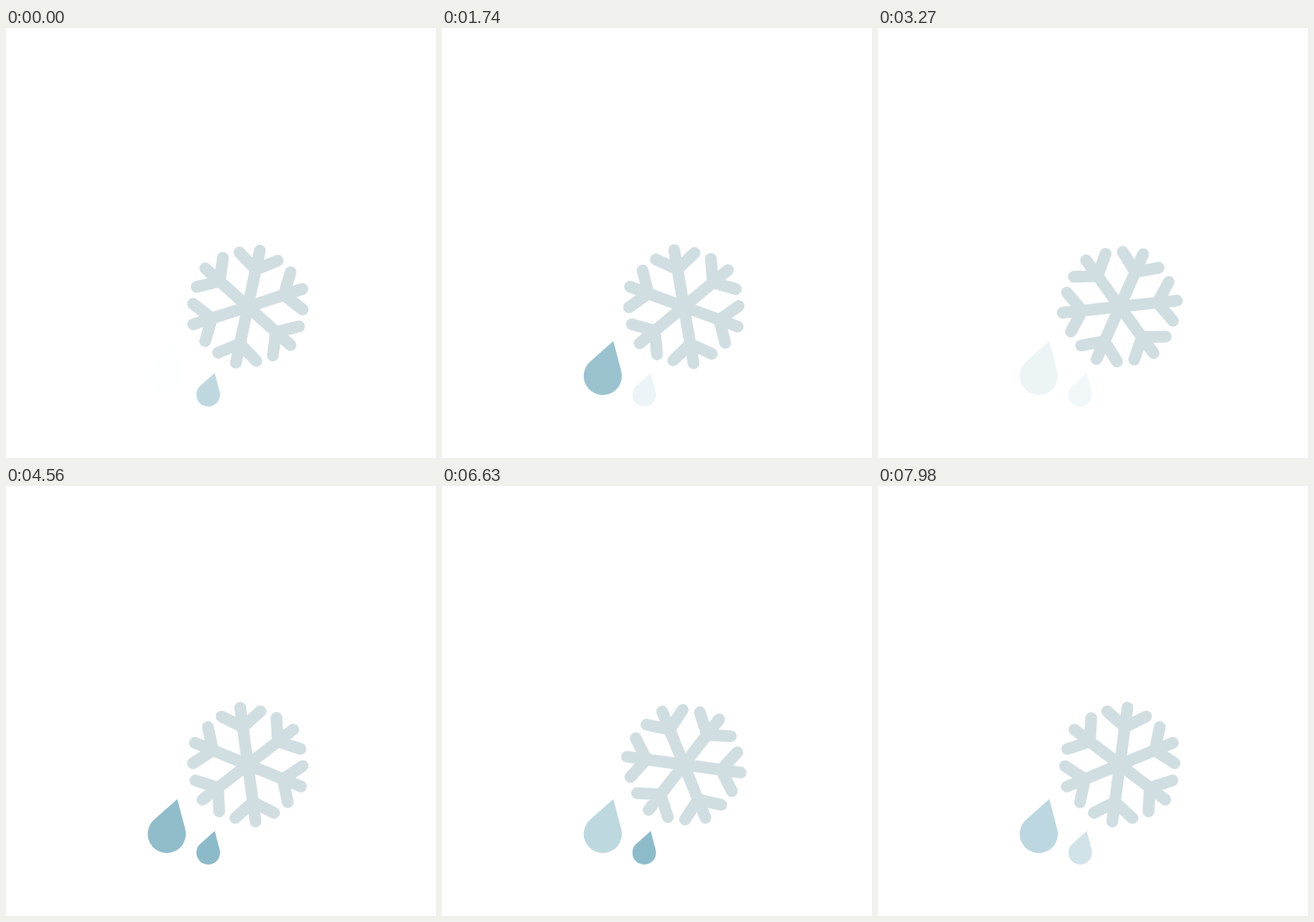
Write an HTML page that moves like this. It is 512 by 512 pixels and loops after 8 s.

```html
<!DOCTYPE html>
<html lang="en">
<head>
<meta charset="utf-8">
<title>Snowflake and drops</title>
<style>
  html, body { margin: 0; width: 100%; height: 100%; overflow: hidden; background: #fff; }
  svg { display: block; width: 100vw; height: 100vh; }
</style>
</head>
<body>
<svg viewBox="0 0 512 512">
  <defs>
    <path id="arm" d="M0 0V-68.3M-23.3-61L0-45L23.3-61"/>
    <!-- Teardrop around the centre of its round end -->
    <path id="drop" d="M12.5-41.5L21.9-5.8A22.7 22.7 0 1 1-15.1-17Z"/>
  </defs>
  <g id="flake" fill="none" stroke="#d1dee1" stroke-width="14" stroke-linecap="round"></g>
  <g fill="#8cbac8">
    <use id="big" href="#drop" transform="translate(191.5 414.3)"/>
    <use id="small" href="#drop" transform="translate(240.8 436.6) scale(.62)"/>
  </g>
</svg>
<script>
  const LOOP = 8000;
  const START_ANGLE = 12;
  const DEGREES_PER_SECOND = 22;

  const flake = document.getElementById('flake');
  const big = document.getElementById('big');
  const small = document.getElementById('small');

  for (let i = 0; i < 6; i++) {
    const arm = document.createElementNS('http://www.w3.org/2000/svg', 'use');
    arm.setAttribute('href', '#arm');
    arm.setAttribute('transform', `rotate(${i * 60})`);
    flake.append(arm);
  }

  // Smooth fade between 0 and 1, brightest at `peak`
  const pulse = (t, period, peak) => (1 + Math.cos(2 * Math.PI * (t - peak) / period)) / 2;

  function draw(now) {
    const t = now % LOOP;
    const angle = START_ANGLE + DEGREES_PER_SECOND * t / 1000;
    flake.setAttribute('transform', `translate(288 331.8) rotate(${angle})`);
    big.setAttribute('opacity', pulse(t, 2960, 1395));
    small.setAttribute('opacity', pulse(t, 2020, 470));
  }

  const begin = performance.now();
  function tick() {
    draw(performance.now() - begin);
    requestAnimationFrame(tick);
  }
  tick();
</script>
</body>
</html>
```
